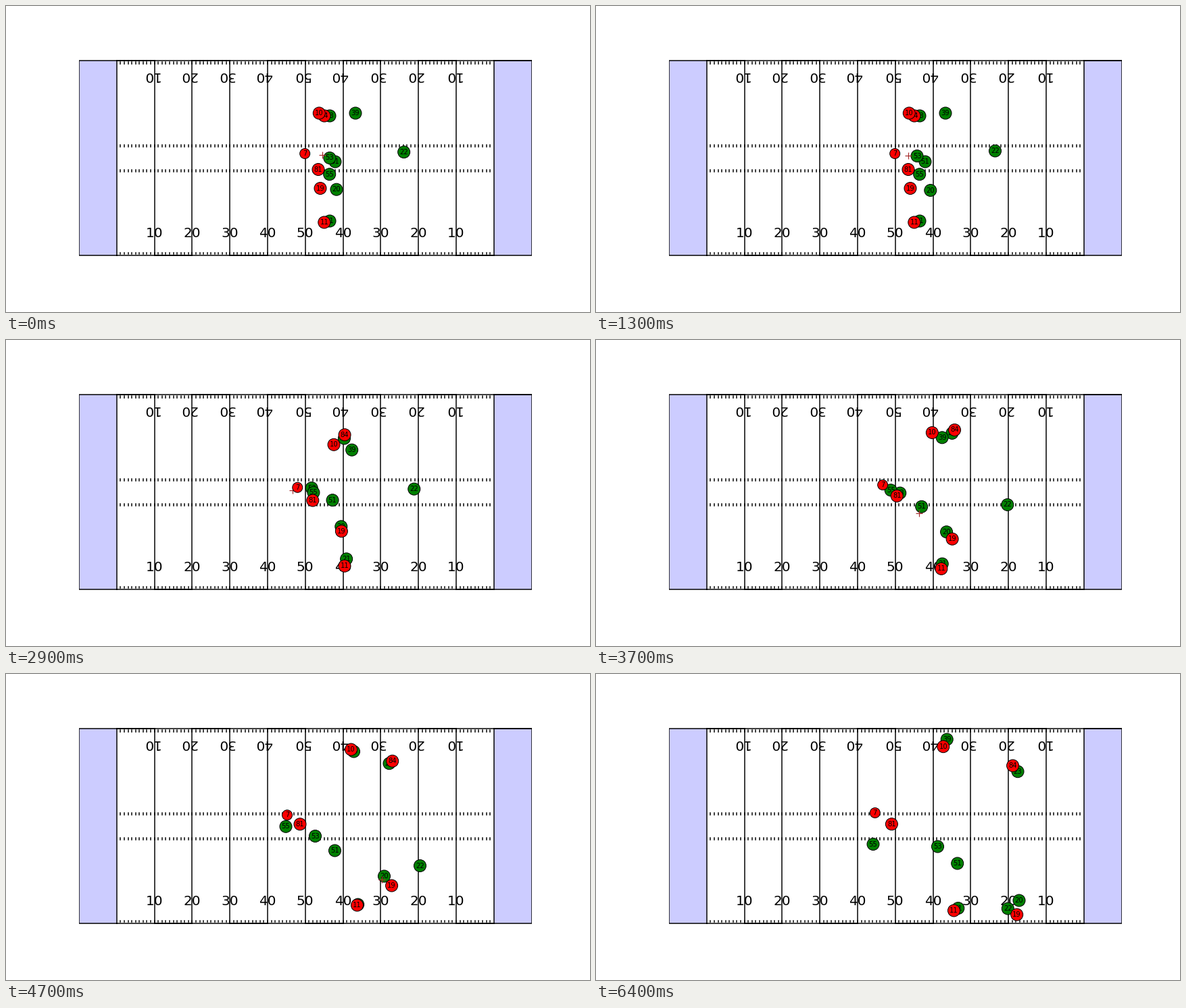
A matplotlib script that plays this animation: 864x454 px, repeating every 6500 ms.

```python
import numpy as np
import matplotlib.pyplot as plt
from matplotlib.animation import FuncAnimation
from matplotlib.patches import Circle, Rectangle

W, H = 864, 454
FRAMES, STEP = 65, 100
WIDTH = 53.3                  # field width in yards
SNAP, LEG = 13, 17            # frame of the snap, frames per leg of a route

fig = plt.figure(figsize=(12, 6.3056), dpi=72, facecolor='white')
field = fig.add_subplot()
field.set(xlim=(0, 120), ylim=(-6.242, 58.28))
field.axis('off')
stage = fig.add_axes([0, 0, 1, 1])
stage.set(xlim=(0, W), ylim=(H, 0))
stage.axis('off')


def draw_field():
    def line(xs, ys):
        field.plot(xs, ys, color='black', lw=1.5)

    for x in (0, 110):
        field.add_patch(Rectangle((x, 0), 10, WIDTH, fc='#ccccff', lw=0, zorder=0))

    # One stroke: up and down the yard lines, then around the outline.
    xs, ys = [], []
    for i, x in enumerate(range(10, 111, 10)):
        ends = [0, WIDTH] if i % 2 == 0 else [WIDTH, 0]
        xs += [x, x]
        ys += ends
    line(xs + [120, 0, 0, 120, 120], ys + [WIDTH, WIDTH, 0, 0, WIDTH])

    for x in range(11, 110):
        for y0, y1 in ((0.4, 0.7), (52.5, 53.0), (22.91, 23.57), (29.73, 30.39)):
            line([x, x], [y0, y1])
    for x in range(20, 110, 10):
        label = str(min(x, 120 - x) - 10)
        field.text(x, 5, label, size=20, ha='center')
        field.text(x - 0.95, WIDTH - 5, label, size=20, ha='center', rotation=180)


class Player:
    """A numbered disc that drifts until the snap, then runs a smooth route."""

    def __init__(self, number, color, route, z):
        self.route = np.array(route, float)
        self.pace = np.gradient(self.route, axis=0, edge_order=2)
        self.pace[0] = np.array(DRIFT.get(number, (0, 0))) * LEG
        radius = 7.5 if number == 7 else 9
        self.dot = stage.add_patch(Circle((0, 0), radius, fc=color, ec='black',
                                          lw=1, zorder=z))
        self.label = stage.text(0, 0, str(number), size=10, ha='center',
                                va='center', zorder=z + 0.5)

    def at(self, t):
        s = (t - SNAP) / LEG
        if s < 0:
            return self.route[0] + s * self.pace[0]
        i = min(int(s), len(self.route) - 2)
        u = s - i
        (a, b), (va, vb) = self.route[i:i + 2], self.pace[i:i + 2]
        blend = u * u * (3 - 2 * u)
        return a + blend * (b - a) + u * (1 - u) * ((1 - u) * va - u * vb)

    def move(self, t):
        pos = self.at(t)
        self.dot.center = pos
        self.label.set_position(pos)


# Place at the snap and at the end of each leg, in pixels.
DEFENSE = {
    21: [(479, 319), (505, 325.5), (520.7, 342), (535.8, 347.5)],
    22: [(590.5, 215), (604.5, 223), (612.5, 284.5), (609.3, 348)],
    23: [(479, 163), (503, 145), (567, 132.7), (624, 144.7)],
    20: [(494.8, 273.5), (497.5, 277.5), (559.5, 300), (626, 336)],
    39: [(517, 159), (511.6, 162), (514.5, 115), (519.2, 97)],
    51: [(487, 231), (483, 238.5), (486.5, 262), (534.7, 281)],
    53: [(475, 222.5), (451.5, 220), (457.5, 240.5), (505.5, 256)],
    55: [(478.7, 249.7), (453, 225.5), (414, 226.3), (410, 252.5)],
}
OFFENSE = {
    84: [(471, 163), (504, 139.5), (571.7, 129.2), (616.6, 136)],
    10: [(463.3, 159), (486.5, 154), (510.5, 112), (513.8, 107.7)],
    7: [(442.2, 219), (430.5, 218.5), (416, 209.3), (412.8, 206)],
    81: [(462, 242.5), (453, 237.5), (435, 222.8), (437.4, 222.7)],
    19: [(465, 270.5), (499.5, 285), (570.6, 314), (622.7, 357)],
    11: [(470.8, 321), (502.5, 336), (519.5, 343), (529.5, 351)],
}
DRIFT = {20: (0.45, 0.1), 53: (-0.3, -0.23), 22: (0.14, -0.13)}

# Ball: at rest, snapped back, held, thrown, carried.
BALL_T = [12, 20, 30, 49, 64]
BALL_X = [467.5, 424.5, 424, 571, 620]
BALL_Y = [221.3, 223, 223, 315, 356]

draw_field()
players = [Player(n, color, route, z0 + i)
           for squad, color, z0 in ((DEFENSE, 'green', 10), (OFFENSE, 'red', 30))
           for i, (n, route) in enumerate(squad.items())]
ball, = stage.plot([0], [0], '+', color='brown', ms=10, mew=1.2, zorder=25)


def update(t):
    ball.set_data([np.interp(t, BALL_T, BALL_X)], [np.interp(t, BALL_T, BALL_Y)])
    for p in players:
        p.move(t)
    return [ball]


anim = FuncAnimation(fig, update, frames=FRAMES, interval=STEP, repeat=True,
                     repeat_delay=0, blit=False)
plt.show()
```
